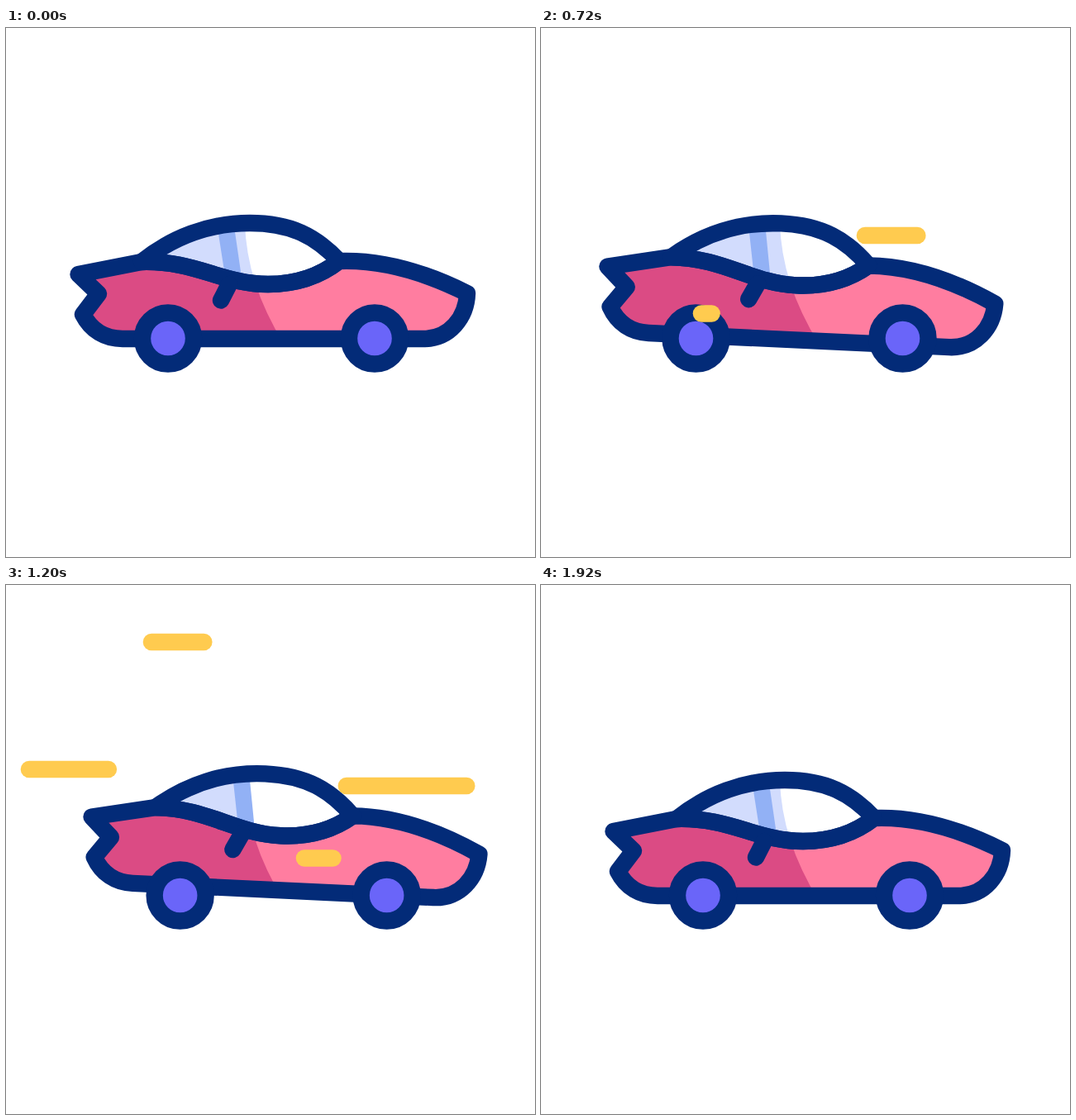
An HTML page that plays this animation: 640 by 640 pixels, repeating every 2000 ms.

```html
<!DOCTYPE html>
<html lang="en">
<head>
<meta charset="utf-8">
<title>Car</title>
<style>
  html, body { margin: 0; height: 100%; overflow: hidden; background: #fff; }
  svg { display: block; width: 100vw; height: 100vh; }
  .ink { fill: none; stroke: #032b78; stroke-width: 20.4; stroke-linecap: round; stroke-linejoin: round; }
  #wheels { fill: #6a65f9; }
  #streaks { stroke: #ffcb4f; stroke-width: 20.6; stroke-linecap: round; }
</style>
</head>
<body>
<svg viewBox="0 0 640 640">
  <defs>
    <!-- The shade stays still while the car slides past it -->
    <clipPath id="shade"><path d="M0 0H289V226Q287.6 313 348 400H0Z"/></clipPath>
    <path id="body" d="M164 283C228 281 262 310 317 310C350 310 380 300 403 282C455 280 510 297 558 321
      C557 350 537 376 505 376H141C120 376 103 366 93 346.500L112 321.500L87.500 298Z"/>
    <path id="glass" d="M164 283C200 254 245 236 295 236C345 236 375 252 403 282C380 300 350 310 317 310C262 310 228 281 164 283Z"/>
  </defs>
  <g class="car">
    <use href="#body" fill="#ff7da0"/>
    <use href="#glass" fill="#fff"/>
  </g>
  <g clip-path="url(#shade)">
    <g class="car">
      <use href="#body" fill="#db4b84"/>
      <use href="#glass" fill="#d2dcfd"/>
    </g>
  </g>
  <g class="car">
    <path d="M255.600 240L275.700 238L285.500 305L265 300Z" fill="#92b1f5"/>
    <g class="ink">
      <use href="#body"/>
      <use href="#glass"/>
      <path d="M270 310L260 329.500"/>
    </g>
  </g>
  <g id="wheels" class="ink">
    <circle cx="196" cy="375.500" r="31"/>
    <circle cx="446" cy="375.500" r="31"/>
  </g>
  <g id="streaks"></g>
</svg>
<script>
const LOOP = 2000, STEP = 40;
const TRAVEL = 200, SWEEP = 360, LAG = 215; // streak path, time per end, delay of the tail

// Smooth rise from 0 to 1 between two times
function ease(t, from, to) {
  const p = Math.min(1, Math.max(0, (t - from) / (to - from)));
  return p * p * (3 - 2 * p);
}

const cars = document.querySelectorAll('.car');
const wheels = document.getElementById('wheels');

function moveCar(t) {
  const settle = ease(t, 1200, 1520);
  const x = -58 * ease(t, 0, 440) + 99 * ease(t, 440, 1000)
          - 61 * ease(t, 1000, 1440) + 20 * ease(t, 1440, 1920);
  const y = 9.7 * ease(t, 0, 560) - 16.2 * ease(t, 560, 880) + 6.5 * settle;
  const tilt = 2.7 * (ease(t, 0, 480) - settle);
  cars.forEach(car => car.setAttribute('transform', `translate(${x} ${y}) rotate(${tilt} 322 322)`));
  wheels.setAttribute('transform', `translate(${x} 0)`);
}

// A streak grows leftwards from x, y, then its tail catches up
function streak(start, x, y) {
  const line = document.createElementNS('http://www.w3.org/2000/svg', 'path');
  document.getElementById('streaks').append(line);
  return t => {
    const head = x - TRAVEL * ease(t - start, 0, SWEEP);
    const tail = x - TRAVEL * ease(t - start, LAG, LAG + SWEEP);
    line.setAttribute('d', tail - head > 2 ? `M${head} ${y}H${tail}` : '');
  };
}

const parts = [
  moveCar,
  streak(0, 532, 92),
  streak(80, 253, 207),
  streak(200, 394, 345.5),
  streak(280, 592, 251),
  streak(720, 561, 330.5),
  streak(760, 376, 69),
  streak(800, 228, 223),
  streak(960, 560, 243)
];

const begin = performance.now();
function tick() {
  const ms = (performance.now() - begin) % LOOP;
  const t = Math.floor(ms / STEP) * STEP;
  parts.forEach(move => move(t));
  requestAnimationFrame(tick);
}
tick();
</script>
</body>
</html>
```
